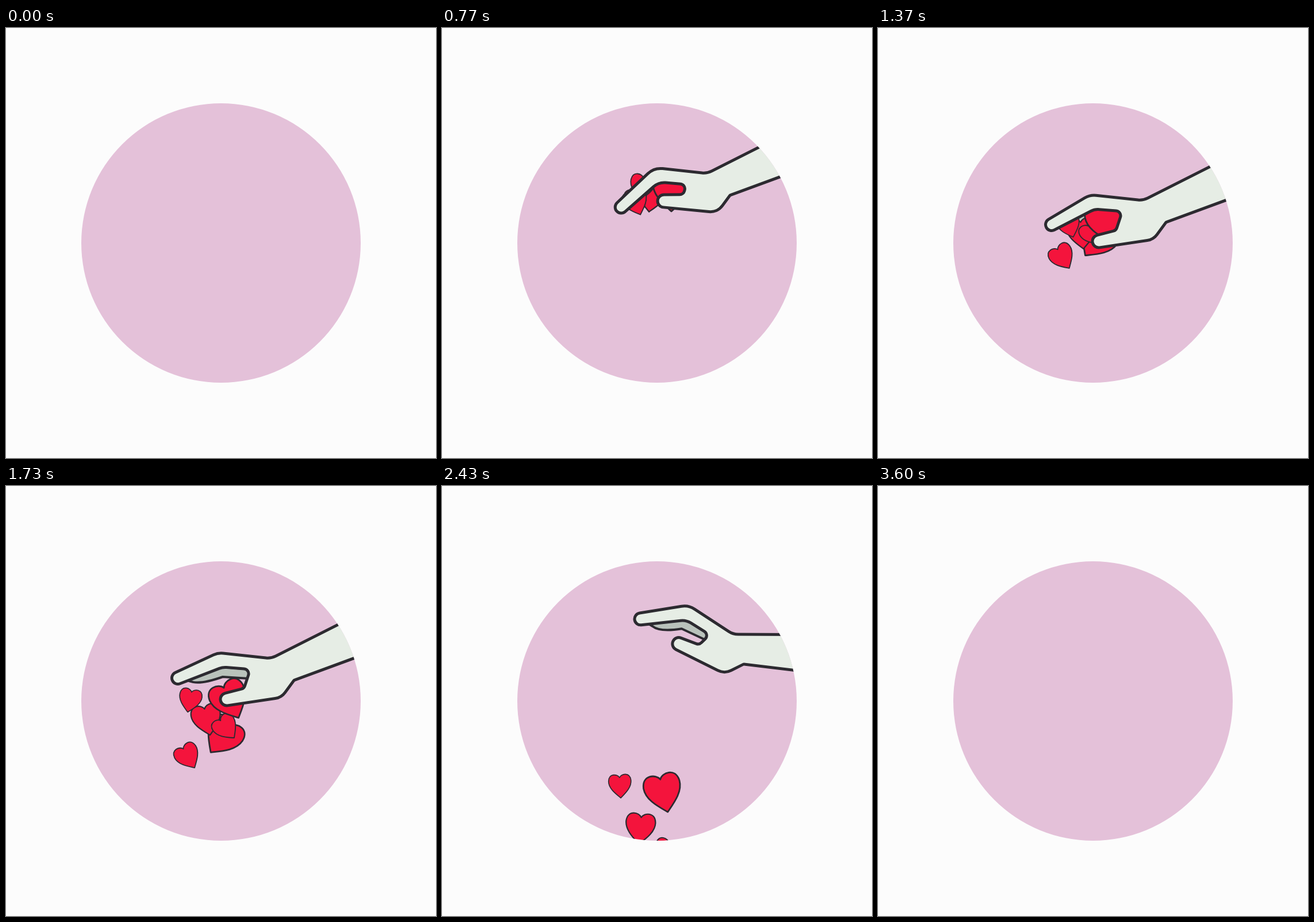
These frames come from a looping animation (748x748 px, 3630 ms). An HTML page with a canvas:

```html
<!DOCTYPE html>
<html lang="en">
<head>
<meta charset="utf-8">
<title>Hand dropping hearts</title>
<style>
  html, body { margin: 0; width: 100%; height: 100%; overflow: hidden; }
  body { background: #fcfcfc; }
  canvas { display: block; width: 748px; height: 748px; }
</style>
</head>
<body>
<canvas id="stage" width="748" height="748"></canvas>
<script>
const ctx = document.getElementById('stage').getContext('2d');
const LOOP = 3630, GRIP = 770, GRAVITY = 1.25e-4;
const INK = '#2c2a30', RED = '#f4143c', SKIN = '#e6ede5', SHADE = '#b9c2bb', DISC = '#e4c1d9';

// Open hand around the top of the wrist.
const HAND = {
  armTop: [220, -111], knuckle: [-92, -10], tip: [-162, 34], joint: [-84, 15],
  palmTop: [-36, 19], palmLow: [-47, 52], thumb: [-77, 71], heel: [18, 68],
  wrist: [40, 38], armLow: [230, -32]
};

// Back to front, placed in the closed hand; angles in degrees.
const HEARTS = [
  { size: 1, x: 397, y: 280, turn: 0, drift: -25, swing: 40, release: 800 },
  { size: .8, x: 364, y: 292, turn: 8, drift: -21, swing: -20, release: 1000 },
  { size: .66, x: 348, y: 276, turn: 10, drift: 45, swing: -50, release: 850 },
  { size: .61, x: 340, y: 294, turn: -34, drift: -35, swing: 52, release: 1230 },
  { size: .66, x: 338, y: 303, turn: -20, drift: -27, swing: -12, release: 750 },
  { size: 1, x: 399, y: 284, turn: 0, drift: -16, swing: -28, release: 1160 }
];

const rad = deg => deg * Math.PI / 180;
const part = (t, from, to) => Math.min(1, Math.max(0, (t - from) / (to - from)));
const smooth = u => u * u * (3 - 2 * u);
const mix = (a, b, u) => [a[0] + (b[0] - a[0]) * u, a[1] + (b[1] - a[1]) * u];

function swivel([x, y], [cx, cy], deg, scale = 1) {
  const c = Math.cos(rad(deg)) * scale, s = Math.sin(rad(deg)) * scale;
  return [cx + (x - cx) * c - (y - cy) * s, cy + (x - cx) * s + (y - cy) * c];
}

// Enter, lower and open, lift, then drift out to the right.
function motionAt(t) {
  const enter = (1 - part(t, 180, 740)) ** 3;
  const open = smooth(part(t, GRIP, 1370));
  const lift = part(t, 2130, 2430) ** 2;
  const exit = Math.max(0, (t - 2430) / 540);
  return {
    shift: [290 * enter, -120 * enter],
    lower: 47 * open,
    x: 461 + 45 * lift + 139 * exit,
    y: 253 - 42 * lift - 32 * exit,
    turn: 27 * lift + 12 * exit,
    finger: -18 * (1 - smooth(part(t, GRIP, 1730))) - 11 * lift,
    thumb: 14 * (1 - open) + 8 * lift + 7 * exit,
    drop: 17 * Math.max(0, 1 - exit)
  };
}

// The finger swings at the knuckle, the thumb at the heel.
function bend({ finger, thumb }) {
  return {
    ...HAND,
    tip: swivel(HAND.tip, HAND.knuckle, finger, 1 - finger * .0045),
    palmLow: swivel(HAND.palmLow, HAND.heel, thumb),
    thumb: swivel(HAND.thumb, HAND.heel, thumb)
  };
}

// Angle on circle c where the line from p touches it.
function touch(p, c, r, side) {
  const dx = p[0] - c[0], dy = p[1] - c[1];
  return Math.atan2(dy, dx) + side * Math.acos(r / Math.hypot(dx, dy));
}

function roundTip(before, c, after, r) {
  ctx.arc(...c, r, touch(before, c, r, -1), touch(after, c, r, 1), true);
}

// Rounded corner at p on the way to a round tip at c.
function cornerToTip(p, c, tipRadius, r) {
  const a = touch(p, c, tipRadius, -1);
  ctx.arcTo(...p, c[0] + tipRadius * Math.cos(a), c[1] + tipRadius * Math.sin(a), r);
}

function paint(fill, width) {
  ctx.fillStyle = fill;
  ctx.strokeStyle = INK;
  ctx.lineWidth = width;
  ctx.lineJoin = 'round';
  ctx.fill();
  ctx.stroke();
}

function placed(x, y, deg, drawPart) {
  ctx.save();
  ctx.translate(x, y);
  ctx.rotate(rad(deg));
  drawPart();
  ctx.restore();
}

function drawHand(h) {
  ctx.beginPath();
  ctx.moveTo(...h.armTop);
  ctx.arcTo(0, 0, ...h.knuckle, 30);
  cornerToTip(h.knuckle, h.tip, 10.5, 32);
  roundTip(h.knuckle, h.tip, h.joint, 10.5);
  ctx.arcTo(...h.joint, ...h.palmTop, 28);
  ctx.arcTo(...h.palmTop, ...h.palmLow, 8.5);
  cornerToTip(h.palmLow, h.thumb, 11, 8.5);
  roundTip(h.palmLow, h.thumb, h.heel, 11);
  ctx.arcTo(...h.heel, ...h.wrist, 26);
  ctx.arcTo(...h.wrist, ...h.armLow, 3);
  ctx.lineTo(...h.armLow);
  paint(SKIN, 5);
}

function drawBackFinger(h, drop) {
  const side = mix(h.tip, h.joint, .34);
  ctx.beginPath();
  ctx.moveTo(...h.tip);
  ctx.lineTo(side[0], side[1] + drop * .8);
  ctx.quadraticCurveTo(side[0] + 16, side[1] + drop, h.joint[0], h.joint[1] + drop);
  ctx.lineTo(...mix(h.palmTop, h.palmLow, .48));
  ctx.lineTo(...h.palmTop);
  ctx.lineTo(...h.joint);
  ctx.closePath();
  paint(SHADE, 4);
}

function heartShape(size) {
  ctx.scale(size, size);
  ctx.beginPath();
  ctx.moveTo(0, -23);
  ctx.bezierCurveTo(5, -34, 30, -38, 32, -14);
  ctx.bezierCurveTo(33, 6, 14, 22, 0, 35);
  ctx.bezierCurveTo(-14, 22, -33, 6, -32, -14);
  ctx.bezierCurveTo(-30, -38, -5, -34, 0, -23);
  ctx.closePath();
  paint(RED, 2.8);
}

function drawHeart(heart, t, lower) {
  const age = Math.max(0, t - heart.release);
  const x = heart.x + heart.drift * (1 - Math.exp(-age / 600));
  const y = heart.y + lower + GRAVITY * age * age;
  const turn = heart.turn + heart.swing * Math.sin(Math.PI * age / 1500);
  placed(x, y, turn, () => heartShape(heart.size));
}

function draw(t) {
  const m = motionAt(t), hand = bend(m);
  const inHand = drawPart => placed(m.x, m.y + m.lower, m.turn, drawPart);
  ctx.clearRect(0, 0, 748, 748);
  ctx.save();
  ctx.beginPath();
  ctx.arc(374, 374, 243, 0, 2 * Math.PI);
  ctx.fillStyle = DISC;
  ctx.fill();
  ctx.clip();
  ctx.translate(...m.shift);
  inHand(() => drawBackFinger(hand, m.drop));
  HEARTS.forEach(heart => drawHeart(heart, t, m.lower));
  inHand(() => drawHand(hand));
  ctx.restore();
}

function tick() {
  draw(performance.now() % LOOP);
  requestAnimationFrame(tick);
}
tick();
</script>
</body>
</html>
```
